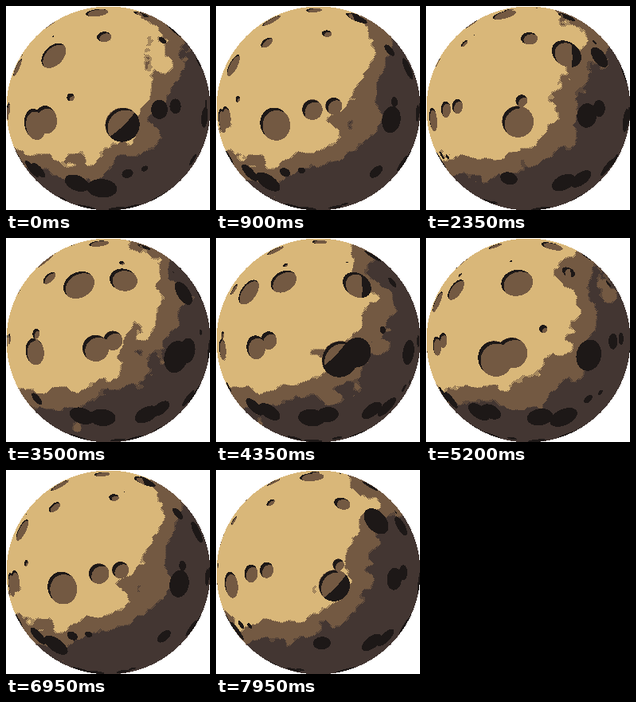
Write an HTML page with a canvas that moves like this. It is 256 px wide and 256 px high and loops after 8000 ms.

```html
<!DOCTYPE html>
<html lang="en">
<head>
<meta charset="utf-8">
<title>Rotating moon</title>
<style>
  html, body { margin: 0; width: 100%; height: 100%; overflow: hidden; background: #fff; }
  canvas { display: block; width: 100%; height: 100%; image-rendering: pixelated; }
</style>
</head>
<body>
<canvas id="stage" width="256" height="256"></canvas>
<script>
const SIZE = 256;
const STEP_MS = 50;
const LOOP_STEPS = 160;
const TURN_STEPS = 120;
const SEED = 7.8;

const LIGHT = { x: 0.25, y: 0.25 };
const MID_BORDER = 0.615;
const DARK_BORDER = 0.729;
const CRATER_BORDER = 0.465;
const DITHER = 2 / SIZE;
const GROUND_CELLS = 8;
const CRATER_CELLS = 5;

const rgb = (r, g, b) => (255 << 24 | b << 16 | g << 8 | r) >>> 0;
const SAND = rgb(217, 183, 121);
const BROWN = rgb(115, 89, 66);
const UMBER = rgb(67, 54, 50);
const SHADOW = rgb(29, 24, 23);

const wrap = (n, m) => ((n % m) + m) % m;
const fract = n => n - Math.floor(n);

// Tiling grid of pseudo-random values
function randomGrid(cells) {
  const values = Float64Array.from({ length: cells * cells }, (_, i) => {
    const x = i % cells, y = Math.floor(i / cells);
    return fract(Math.sin(x * 12.9898 + y * 78.233) * 15.5453 * SEED);
  });
  return (x, y) => values[wrap(y, cells) * cells + wrap(x, cells)];
}
const groundRand = randomGrid(GROUND_CELLS);
const craterRand = randomGrid(CRATER_CELLS);

function noise(x, y) {
  const ix = Math.floor(x), iy = Math.floor(y);
  const fx = x - ix, fy = y - iy;
  const sx = fx * fx * (3 - 2 * fx), sy = fy * fy * (3 - 2 * fy);
  const a = groundRand(ix, iy), b = groundRand(ix + 1, iy);
  const c = groundRand(ix, iy + 1), d = groundRand(ix + 1, iy + 1);
  return a + (b - a) * sx + (c - a) * sy * (1 - sx) + (d - b) * sx * sy;
}

function fbm(x, y) {
  let value = 0;
  for (let octave = 0, scale = 0.5; octave < 4; octave++, scale /= 2) {
    value += noise(x, y) * scale;
    x *= 2;
    y *= 2;
  }
  return value;
}

// 0 inside a crater, 1 outside, with a soft rim
function pit(x, y) {
  const row = Math.floor(y);
  x += row * 0.31;
  const col = Math.floor(x);
  const h = craterRand(col, row);
  const middle = 0.25 + h / 2, radius = h / 4;
  const dist = Math.hypot(x - col - middle, y - row - middle);
  const t = Math.min(1, Math.max(0, (dist - 0.9 * radius) / (0.1 * radius || 1e-9)));
  return t * t * (3 - 2 * t);
}

function crater(u, v, turn) {
  const x = (u + turn) * CRATER_CELLS, y = v * CRATER_CELLS;
  return 1 - pit(x + 11, y + 11) * pit(x + 12, y + 12);
}

// Everything about a pixel that does not change over time
const pixels = [];
for (let py = 0; py < SIZE; py++) {
  for (let px = 0; px < SIZE; px++) {
    const x = px / SIZE, y = py / SIZE;
    const radius = Math.hypot(x - 0.5, y - 0.5);
    if (radius > 0.49999) continue;
    const bulge = 1 + Math.sqrt(1 - 4 * radius * radius);
    const warp = fbm(x, y);
    pixels.push({
      index: py * SIZE + px,
      u: 0.5 + (x - 0.5) / bulge,
      v: 0.5 + (y - 0.5) / bulge,
      gx: x * GROUND_CELLS + warp,
      gy: y * GROUND_CELLS + warp,
      lit: Math.hypot(x - LIGHT.x, y - LIGHT.y),
      rim: 1 - 2 * radius,
      checker: (px + py) % 2 === 0
    });
  }
}

function groundColor(p, turn) {
  const shade = p.lit + fbm(p.gx + turn * GROUND_CELLS, p.gy) * 0.3;
  const past = border => shade > border && !(p.checker && shade < border + DITHER);
  if (past(DARK_BORDER)) return UMBER;
  return past(MID_BORDER) ? BROWN : SAND;
}

function pixelColor(p, turn) {
  const depth = crater(p.u, p.v, turn);
  if (depth < 0.5) return groundColor(p, turn);
  if (p.lit > CRATER_BORDER) return SHADOW;
  const offset = crater(p.u + (LIGHT.x - 0.5) * 0.03, p.v + (LIGHT.y - 0.5) * 0.03, turn);
  return offset < depth - p.rim ? SHADOW : BROWN;
}

const ctx = document.getElementById('stage').getContext('2d');
const image = ctx.createImageData(SIZE, SIZE);
const buffer = new Uint32Array(image.data.buffer);
let shown = -1;

function draw(step) {
  const turn = (step % TURN_STEPS) / TURN_STEPS;
  for (const p of pixels) buffer[p.index] = pixelColor(p, turn);
  ctx.putImageData(image, 0, 0);
  shown = step;
}

const start = performance.now();
function tick() {
  const step = Math.floor((performance.now() - start) / STEP_MS) % LOOP_STEPS;
  if (step !== shown) draw(step);
  requestAnimationFrame(tick);
}
draw(0);
requestAnimationFrame(tick);
</script>
</body>
</html>
```
